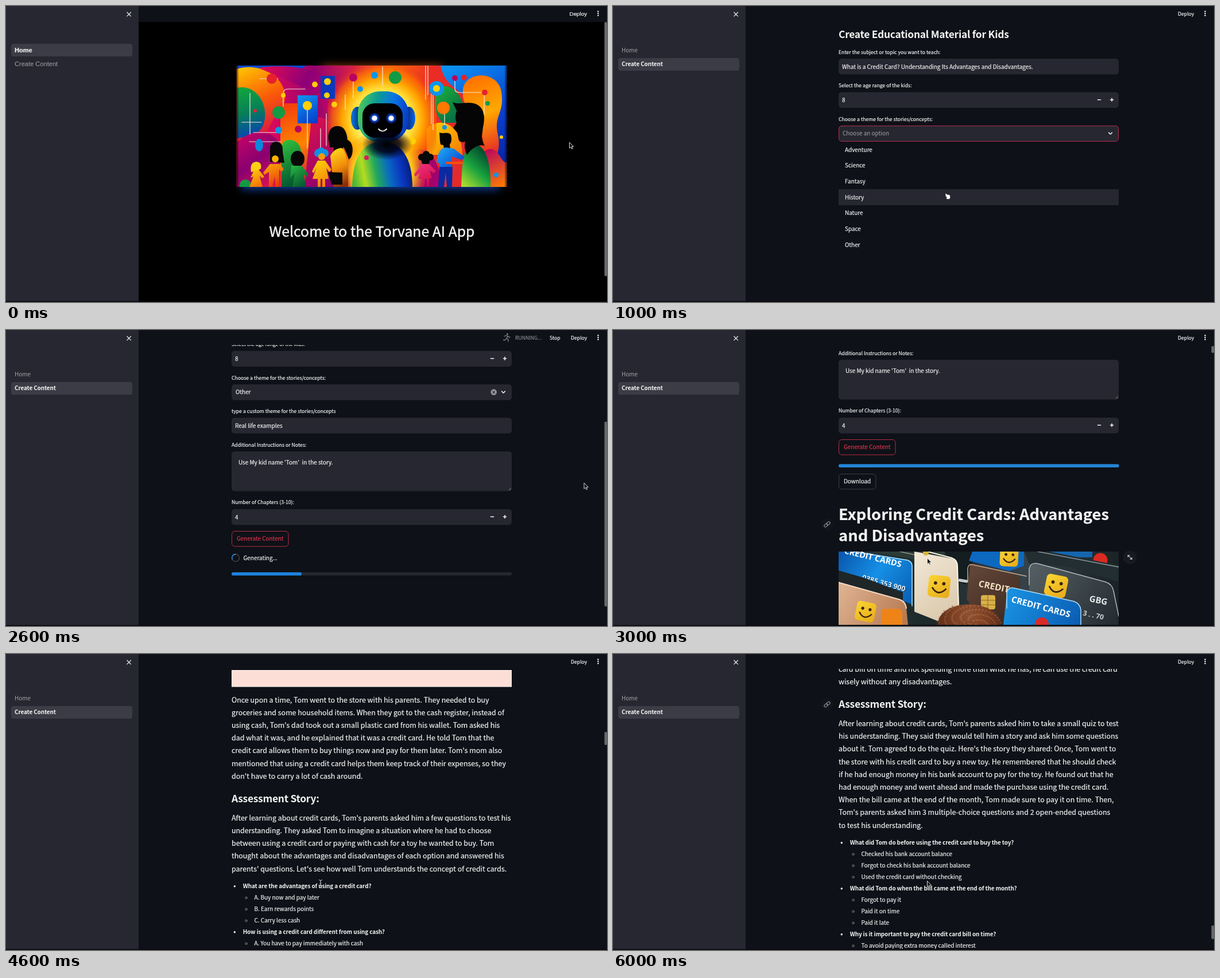
An HTML page with a canvas that plays this animation: 1047x517 px, repeating every 7 s.

```html
<!DOCTYPE html>
<html lang="en">
<head>
<meta charset="utf-8">
<title>Teaching material demo</title>
<style>
html, body { margin: 0; width: 100%; height: 100%; overflow: hidden; background: #0e1117; }
canvas, svg { position: absolute; left: 0; top: 0; width: 1047px; height: 517px; }
text { font-family: "Noto Sans CJK SC", "Noto Sans CJK JP", "Noto Sans CJK", sans-serif; font-size: 9.93px; color: #f4f4f5; fill: currentColor; stroke: currentColor; stroke-width: .2px; white-space: pre; }
.label { font-size: 8.69px; }
.para { font-size: 12.41px; }
.strong { font-weight: 600; letter-spacing: -.012em; stroke: none; }
.h1 { font-size: 27.3px; font-weight: 700; }
.h2 { font-size: 22.33px; font-weight: 600; letter-spacing: -.014em; stroke: none; }
.h3 { font-size: 17.37px; font-weight: 600; letter-spacing: -.014em; stroke: none; }
.hero { font-size: 24.8px; stroke-width: .5px; }
.dim { color: #a3a4a9; stroke: none; }
.red { color: #d8344d; }
.plain { font-family: "Liberation Sans", Arial, sans-serif; font-size: 11.09px; }
.plain.small { font-size: 9.9px; }
.bold { font-weight: 700; }
</style>
</head>
<body>
<canvas id="stage" width="1047" height="517"></canvas>
<svg viewBox="0 0 1047 517">
  <clipPath id="below"><rect x="232" y="26" width="810" height="489"/></clipPath>
  <g id="bar"></g>
  <g id="page" clip-path="url(#below)"></g>
  <g id="pointer"></g>
</svg>
<script>
const c = document.getElementById('stage').getContext('2d');
const [bar, page, pointer] = ['bar', 'page', 'pointer'].map(id => document.getElementById(id));
const PANEL = '#262730', DARK = '#0e1117', INK = '#f4f4f5';

// Drawing helpers
function node(parent, tag, attrs, content = '') {
  const el = document.createElementNS('http://www.w3.org/2000/svg', tag);
  for (const k in attrs) el.setAttribute(k, attrs[k]);
  el.textContent = content;
  parent.append(el);
}
const text = (x, y, s, cls = '', parent = page) => node(parent, 'text', { x, y, class: cls }, s);
const lines = (y, step, cls, rows) => rows.forEach((s, i) => text(393, y + i * step, s, cls));

function rect(x, y, w, h, fill, r = 0, stroke) {
  c.beginPath();
  c.roundRect(x, y, w, h, r);
  if (fill) { c.fillStyle = fill; c.fill(); }
  if (stroke) { c.strokeStyle = stroke; c.lineWidth = 1; c.stroke(); }
}
function oval(x, y, rx, ry, fill, turn = 0) {
  c.beginPath();
  c.ellipse(x, y, rx, ry, turn, 0, 7);
  c.fillStyle = fill;
  c.fill();
}
const dot = (x, y, r, fill) => oval(x, y, r, r, fill);
function shape(d, fill) {
  c.fillStyle = fill;
  c.fill(new Path2D(d));
}
function line(d, color = INK, width = 1) {
  c.strokeStyle = color;
  c.lineWidth = width;
  c.lineCap = c.lineJoin = 'round';
  c.stroke(new Path2D(d));
}
function stops(g, colors) {
  colors.forEach((k, i) => g.addColorStop(i / (colors.length - 1), k));
  return g;
}
const lin = (x0, y0, x1, y1, ...k) => stops(c.createLinearGradient(x0, y0, x1, y1), k);
const rad = (x, y, r, ...k) => stops(c.createRadialGradient(x, y, 0, x, y, r), k);
function inside(x, y, w, h, draw) {
  c.save();
  c.beginPath();
  c.rect(x, y, w, h);
  c.clip();
  draw();
  c.restore();
}
function word(x, y, s, size, turn, fill = '#fff') {
  c.save();
  c.translate(x, y);
  c.rotate(turn);
  c.font = `700 ${size}px "Open Sans", sans-serif`;
  c.fillStyle = fill;
  c.fillText(s, 0, 0);
  c.restore();
}

// Pointers
const arrow = (x, y) => node(pointer, 'path', {
  d: 'M0 0V10.4L2.4 8.2L4.2 11.8L5.8 11L4.1 7.5H7.2Z',
  transform: `translate(${x} ${y})`, fill: '#111', stroke: '#e8e8e8', 'stroke-width': .9
});
const beam = () => node(pointer, 'path', {
  d: 'M545 394.5Q548 394.5 548 397Q548 394.5 551 394.5M548 396V404M545 405.5Q548 405.5 548 403Q548 405.5 551 405.5M546.5 400.5H549.5',
  fill: 'none', stroke: '#c4c4c6', 'stroke-width': 1
});
const hand = () => node(pointer, 'path', {
  d: 'M579 329Q578 327.5 580 327.5L583 329.5L586 329.5Q588 331 587.5 335L586 337.5H582L579.5 334.5H582L579.5 332.5Z',
  fill: '#fff', stroke: '#222', 'stroke-width': .6
});

// Interface parts
function chrome(thumb, home) {
  rect(0, 0, 1047, 517, DARK);
  if (home) rect(231, 28, 816, 488, '#000');
  rect(0, 0, 231, 517, PANEL);
  rect(9, home ? 66 : 91, 211, 22, '#3b3c45', 4);
  rect(0, 515.5, 1047, 1.5, '#07080b');
  line('M210.8 11L217.6 17.8M217.6 11L210.8 17.8', INK, 1.1);
  [9.4, 13, 16.6].forEach(y => dot(1031.5, y, 1.25, INK));
  if (thumb) rect(1042.5, thumb[0], 4.5, thumb[1] - thumb[0], '#68696c', 2);
  if (home) {
    text(15, 81, 'Home', 'plain bold', bar);
    text(15, 105, 'Create Content', 'plain dim', bar);
    text(981.5, 16.8, 'Deploy', 'plain small', bar);
  } else {
    text(15, 80.8, 'Home', 'dim', bar);
    text(15, 105.4, 'Create Content', 'strong', bar);
    text(984, 16.8, 'Deploy', 'label', bar);
  }
}
const box = (y, h = 27.5) => rect(393, y, 488, h, PANEL, 5);
function field(y, s) {
  box(y);
  text(399, y + 17.5, s);
}
function stepper(y, s) {
  field(y, s);
  const m = y + 13.3;
  line(`M844.5 ${m}H849.5M866.5 ${m}H871.5M869 ${m - 2.5}V${m + 2.5}`, INK, 1.6);
}
const chevron = y => line(`M863.6 ${y - 1.4}L866.5 ${y + 1.5}L869.4 ${y - 1.4}`, INK, 1.5);
function button(y, w, s, cls, edge) {
  rect(393.5, y + .5, w, 26.5, DARK, 5, edge);
  text(402, y + 17.3, s, cls);
}
function notes(y) {
  text(393, y + 3.3, 'Additional Instructions or Notes:', 'label');
  box(y + 11.5, 69.5);
  text(405, y + 34.5, "Use My kid name 'Tom'  in the story.");
  line(`M876 ${y + 79}L879.5 ${y + 75.5}M878.2 ${y + 79}L879.5 ${y + 77.7}`, '#a0a0a4', .7);
  text(393, y + 103.8, 'Number of Chapters (3-10):', 'label');
  stepper(y + 112.5, '4');
  button(y + 150.5, 98.5, 'Generate Content', 'red', '#b52f47');
}
function link(y) {
  dot(373, y, 11, '#12151c');
  c.save();
  c.translate(373, y);
  c.rotate(-.7);
  rect(-6, -2.2, 6.4, 4.4, null, 2.2, '#a0a1a6');
  rect(-.4, -2.2, 6.4, 4.4, null, 2.2, '#a0a1a6');
  c.restore();
}
// Leading mark: "*" bold question, "-" answer, "+" plain bullet, "_" continuation
function list(y, rows, step = 20) {
  rows.forEach((row, i) => {
    const kind = row[0], m = y + i * step, sub = kind === '-';
    if (sub) {
      c.beginPath();
      c.arc(418.5, m + .3, 1.7, 0, 7);
      c.strokeStyle = '#b5b5b9';
      c.lineWidth = .7;
      c.stroke();
    } else if (kind !== '_') dot(398.3, m + .2, 1.7, INK);
    text(sub ? 432.5 : 412.7, m + 3.8, row.slice(1), kind === '*' ? 'strong' : '');
  });
}

// Pictures
function smiley(x, y, s, turn = .15) {
  c.save();
  c.translate(x, y);
  c.rotate(turn);
  c.scale(s / 34, s / 34);
  rect(-17, -17, 34, 34, lin(-17, -17, 17, 17, '#fbd634', '#e5a91a'), 6);
  dot(-6, -5, 2.6, '#3c220c');
  dot(7, -5, 2.6, '#3c220c');
  line('M-10 3Q0 16 11 3', '#3c220c', 2.4);
  c.restore();
}

function party() {
  c.save();
  c.shadowBlur = 15;
  c.shadowColor = '#a8430c';
  c.shadowOffsetY = -3;
  rect(550, 108, 210, 30, '#000');
  c.shadowColor = '#123f9c';
  c.shadowOffsetY = 5;
  rect(410, 290, 450, 25, '#000');
  c.restore();
  inside(401.5, 104, 471.5, 212, () => {
    rect(401, 104, 473, 213, lin(402, 0, 873, 0, '#e8261f', '#d4085f', '#93026f', '#d5204a', '#ff7a08', '#ec2c22', '#e02a30', '#f0600c'));

    // Left backdrop
    shape('M402 104H522Q500 128 470 116T402 122Z', '#0b48cf');
    shape('M402 110C440 98 480 120 486 152S455 190 450 245H402Z', lin(402, 110, 460, 230, '#ffc400', '#fa5a08', '#d80f4c'));
    shape('M440 108C490 100 560 108 580 150C585 190 560 205 545 160C520 140 485 128 440 108Z', lin(450, 104, 580, 180, '#e20a52', '#8d0078', '#c8085e'));
    shape('M402 143C432 136 454 165 451 195S426 228 402 231Z', lin(402, 145, 430, 230, '#12a63c', '#067f58', '#0640ba'));
    shape('M402 238C440 205 472 220 483 255V316H402Z', lin(402, 220, 475, 316, '#cd0565', '#8a0070', '#e5184c'));
    shape('M478 170H535V316H478Z', lin(478, 170, 530, 316, '#f23a0e', '#ff8300', '#cc0a48'));
    shape('M480 316V246C482 226 517 230 514 260V316Z', lin(480, 235, 515, 310, '#2fc03c', '#03502f'));
    shape('M532 196C560 188 592 210 600 316H520Z', lin(530, 200, 600, 300, '#d8104f', '#870070'));

    // Right backdrop and halo
    shape('M700 316V262C720 235 755 255 760 316Z', '#a3046c');
    shape('M733 214C755 192 795 205 795 260H733Z', lin(735, 205, 790, 260, '#ffd400', '#f67a06'));
    shape('M748 155C760 120 805 150 800 204H760Q742 180 748 155Z', lin(750, 150, 800, 200, '#19ab3b', '#045f48'));
    shape('M757 104H873V316H836C850 270 840 200 824 178C800 150 765 145 757 104Z', lin(770, 110, 873, 290, '#0c90f0', '#0843d4', '#071f98'));
    shape('M796 146C800 113 857 112 863 150S849 190 857 225S842 295 834 245S792 180 796 146Z', lin(800, 120, 855, 260, '#ff6a00', '#ffa800', '#e42228'));
    shape('M832 255C858 235 862 280 873 272V316H832Z', lin(835, 250, 870, 316, '#b9045f', '#ff8000'));
    rect(560, 104, 190, 213, rad(656, 198, 106, '#fff', '#fffbd8', '#fff3a0', '#ffe03a', '#ffa400', 'rgba(255,110,0,.7)', 'rgba(220,20,40,0)'));
    oval(656, 290, 78, 70, rad(656, 290, 78, '#ffe24a', '#ffe24a', '#ffc61a', 'rgba(255,150,0,0)'));

    // Panels, circuit lines and dots
    rect(508, 156, 35, 49, lin(508, 156, 540, 205, '#0f98f2', '#0738c6'));
    rect(548, 122, 25, 40, '#0a39bd');
    line('M425 152V224M411 203H445M442 127H474M431 221H480M424 237H479M483 175V153Q483 145 491 145H521M525 174V248M548 214V262M558 188V244M591 155V181M605 126V161M656 106V139M731 104V163M735 104V155M741 153V206M744 153V216M764 178V211M782 124V145Q782 151 790 151H834M833 151V190', '#f7eadc', 1.2);
    const hues = ['#ffcf0a', '#e5222c', '#0a96ec', '#129a44', '#b8045f', '#ff7800'];
    [463, 127, 9, 1, 475, 186, 11, 3, 483, 156, 4, 0, 525, 174, 8, 0, 538, 137, 5, 0,
      560, 132, 6, 0, 559, 156, 5, 0, 572, 172, 5, 0, 605, 125, 7, 4, 617, 145, 5, 2,
      642, 121, 6, 2, 678, 125, 11, 3, 750, 144, 13, 2, 750, 144, 6, 0, 762, 178, 11, 5,
      782, 126, 5, 4, 798, 125, 5, 1, 834, 151, 5, 1, 839, 170, 4, 3, 475, 217, 6, 2,
      434, 183, 3, 1, 509, 215, 6, 4, 764, 212, 4, 2, 708, 236, 6, 0, 863, 229, 3, 0
    ].forEach((v, i, a) => { if (i % 4 === 0) dot(v, a[i + 1], a[i + 2], hues[a[i + 3]]); });
    oval(441, 243, 7, 11, '#0a88dc');
    dot(417, 313, 10, '#129a44');
    dot(854, 295, 4, hues[2]);

    // Robot
    oval(612, 196, 11, 20, lin(602, 0, 622, 0, '#0a78e0', '#04124c'));
    oval(702, 196, 11, 20, lin(692, 0, 713, 0, '#04124c', '#0a68ea'));
    rect(613, 149, 88, 89, lin(613, 185, 701, 200, '#4cc85c', '#0c9c94', '#0a72e6', '#0838c4'), 38);
    rect(621, 170, 70, 60, '#000', 21);
    [642, 671].forEach(x => {
      dot(x, 196, 9.5, rad(x, 196, 9.5, '#49b8ff', '#0f4fee', '#020830'));
      dot(x, 196, 4.6, '#fff');
    });
    line('M649 215Q656 222 663 215', '#fff', 2);
    shape('M603 316C604 260 624 237 656 237S708 265 708 316Z', lin(603, 300, 708, 280, '#3fb53a', '#b4dc20', '#22a85a', '#0a6cc0', '#0a36c0', '#051a70'));
    c.save();
    c.translate(664, 242);
    c.scale(1, .62);
    dot(0, 0, 44, rad(0, 0, 44, '#000', 'rgba(0,0,20,.85)', 'rgba(0,0,30,0)'));
    c.restore();
    dot(628, 265, 4, '#d81b60');

    // Adults
    shape('M562 236C559 218 568 208 580 210C590 211 594 222 595 234C607 238 606 264 597 268C594 258 590 250 588 246L583 256H570L571 247H564Z', '#050505');
    shape('M565 262Q572 248 585 248Q597 256 596 316H571Z', lin(566, 255, 594, 310, '#ffd21a', '#f08c08', '#8a2c06'));
    shape('M561 290L586 291V312H567Z', '#080808');
    shape('M793 316C795 281 794 254 808 244C834 232 846 275 844 316Z', lin(797, 312, 843, 262, '#a8dc30', '#18a23e', '#034a30'));
    shape('M778 168C790 173 800 167 815 170C832 174 836 192 831 212L829 228Q830 238 834 244Q818 240 803 260Q797 248 800 237Q788 240 788 230L786 221L779 213L785 204Q781 194 785 183Z', '#050505');
    shape('M755 221C762 224 770 219 775 225Q778 236 773 242L774 250H763L762 243L757 242L756 236Z', '#050505');
    shape('M750 273Q753 248 766 247L780 249L799 264L794 269L777 263V283H755V275Z', lin(752, 245, 785, 280, '#20b0f6', '#0850d4'));
    shape('M755 281H778L777 316H768L766 291L763 316H753Z', '#0a2aa2');

    // Children
    shape('M460 272V247Q461 236 472 237Q483 239 482 254L485 274Z', '#080808');
    dot(469, 267, 6, '#ffb400');
    shape('M460 276H478L484 286L480 289L476 286V316H470L468 298L464 316H458V290L450 295L448 291Z', lin(460, 275, 478, 316, '#f8a208', '#e8300c'));
    shape('M427 290Q424 272 437 272Q446 273 444 284L438 288Z', '#ffcf14');
    shape('M432 287H441L450 298L447 301L442 297L447 316H424L431 298L426 300Z', lin(430, 284, 446, 316, '#ffca0a', '#f06a08'));
    oval(508, 267, 12, 14, '#070707');
    shape('M497 279H515L527 294L523 299L518 293L523 316H499L503 292L495 300Z', lin(497, 279, 523, 316, '#28b440', '#034f2e'));
    [544, 549, 555].forEach((x, i) => dot(x, 257 - i % 2 * 3, 7, '#0c90e4'));
    dot(550, 263, 6, '#f49a0a');
    shape('M543 270H556L567 286L563 290L558 283L562 302H556V316H551V302H548V316H543V302H534L541 282L536 292L533 289Z', lin(540, 270, 562, 310, '#ffd00a', '#f08208'));
    [724, 732, 739].forEach((x, i) => dot(x, 264 - i % 2 * 5, 6, '#080808'));
    dot(731, 271, 7, '#080808');
    shape('M725 276H737L749 288L745 292L738 287L742 301H737V315H733V302H729V315H725V302H718L722 290L713 298L711 294Z', lin(720, 276, 742, 312, '#f0307c', '#d00a44'));
    line('M768 274H794', '#f5500c', 4);

    // Darkened rim
    const rim = 'rgba(0,0,0,.75)', none = 'rgba(0,0,0,0)';
    rect(401, 104, 5, 212, lin(401, 0, 406, 0, rim, none));
    rect(868, 104, 5, 212, lin(873, 0, 868, 0, rim, none));
  });
}

function cards() {
  inside(393, 387, 488, 128, () => {
    rect(393, 387, 488, 128, lin(393, 0, 881, 0, '#2a3c40', '#1c2829', '#36424a', '#1a2225'));
    shape('M455 387H578V412L520 400Z', '#2c3b36');
    line('M500 387L577 404V430', '#8d9990', 1.4);
    shape('M578 387H632L615 445L602 440Z', '#141d20');
    shape('M626 387H716V412L690 421L620 403Z', '#0d68c0');
    smiley(690, 397, 32, .05);
    rect(760, 387, 75, 10, '#1566ae');
    dot(849, 402, 12.5, '#dc2a22');
    shape('M716 387H760L881 411V440L800 415L725 408Z', '#222e31');
    line('M740 387L881 414', '#8e9ba0', 1.3);

    // Left cards
    shape('M393 387H425L513 401Q522 404 522 412V480L393 425Z', lin(393, 387, 522, 470, '#0a55ac', '#1590e6', '#0a60b4'));
    line('M418 387L513 402Q521 405 521 412V482', '#b1dcf0', 1.5);
    word(402, 390, 'CREDIT CARDS', 14.5, .24);
    word(434, 437, '0385 353 900', 12.5, .27, '#12385c');
    word(433, 436, '0385 353 900', 12.5, .27, '#e4f2fa');
    shape('M525 387L590 399Q600 403 600 412L603 486L570 510L525 492Z', lin(525, 390, 600, 500, '#f2e8d6', '#d9c7aa'));
    line('M548 387L590 398Q600 402 600 412L602 486', '#fff6e4', 2);
    smiley(568, 448, 38, .1);
    dot(545, 389, 5, '#d6b43a');
    line('M604 437L616 439', '#c8d0cf', 5);
    shape('M393 420L438 433L505 458V474L393 440Z', '#1e2628');
    shape('M393 440L500 471Q510 475 511 486L514 515H393Z', lin(393, 440, 510, 515, '#e0b594', '#b5784f'));
    line('M393 441L500 471Q510 475 511 486', '#f4d8c2', 2);
    smiley(440, 492, 34, .2);
    rect(467, 487, 37, 34, '#ee8418', 8);

    // Right cards
    shape('M622 409L698 425Q708 428 709 440V515H650L616 470Z', lin(620, 410, 700, 515, '#64483a', '#3c281f'));
    line('M618 438V416Q619 408 627 410L720 430', '#c9aa8c', 1.5);
    word(636, 448, 'CREDIT', 15.5, .2, '#f2e2c2');
    rect(641, 463, 25, 25, '#d9b146', 4);
    line('M641 472H666M641 480H666M653 463V488', '#876627', 1);
    shape('M725 418Q727 405 740 408L858 440Q870 444 872 456L881 515H790L725 465Z', lin(725, 410, 870, 515, '#566064', '#252d31'));
    line('M725 445V418Q727 405 740 408L858 440Q870 444 872 456L881 500', '#afb8bb', 1.5);
    smiley(772, 447, 38, .2);
    word(829, 474, 'GBG', 15, .2, '#e5e9ea');
    word(818, 498, '3 . . 70', 12, .22, '#cdd4d7');
    shape('M686 459Q688 448 700 451L803 474Q814 478 815 489V515H680Z', lin(686, 450, 815, 515, '#1a94e4', '#0a5cb2'));
    line('M686 486V459Q688 448 700 451L803 474Q814 478 815 489V515', '#abdcf3', 1.5);
    word(693, 475, 'CREDIT CARDS', 15, .26);
    dot(747, 514, 12, '#d82b28');

    // Curly hair
    oval(620, 513, 54, 34, rad(622, 496, 58, '#9c5c3a', '#834527', '#5a2b18'));
    for (let i = 0; i < 420; i++) {
      const a = i * 2.4, r = Math.sqrt(i / 420) * 1.04;
      dot(620 + Math.cos(a) * r * 54, 513 + Math.sin(a) * r * 34, 1.5, i % 3 ? '#6b351c80' : '#b0704a70');
    }
  });
}

function savings() {
  inside(393, 427, 488, 88, () => {
    rect(393, 427, 488, 88, '#fcfcfb');
    oval(639, 542, 228, 91, '#9ed0dc');
    rect(603, 471, 67, 60, '#bb7650', 5);
    rect(609, 478, 55, 50, '#fbfaf5');
    rect(620, 467, 35, 11, '#87969b', 4);
    dot(637.5, 466, 6, '#718087');
    dot(637.5, 465, 2.5, '#d9e9ec');
    word(624, 493, 'SVING', 8, .02, '#34383b');
    shape('M618 515V507H614L622 498L630 506H626V515Z', '#df6670');
    shape('M632 515V502H628L635 495L642 502H639V515Z', '#65ac77');
    shape('M646 515V508H643L650 498L657 507H653V515Z', '#df6670');
    oval(494, 510, 15, 10, '#9d422e', -.2);
    oval(529, 524, 43, 23, '#ad4c32');
    line('M482 512Q490 499 505 507M506 515Q526 498 553 510M520 515Q535 506 552 513', '#672819', 1.7);
    oval(796, 516, 23, 10, '#f7fbfb');
  });
}

// Scenes, one second each
const scenes = [
  () => {
    chrome([28, 472], true);
    party();
    text(458.5, 403, 'Welcome to the Torvane AI App', 'hero');
    arrow(981.5, 238);
  },
  () => {
    chrome();
    text(393, 56.2, 'Create Educational Material for Kids', 'h3');
    text(393, 83.5, 'Enter the subject or topic you want to teach:', 'label');
    field(92, 'What is a Credit Card? Understanding Its Advantages and Disadvantages.');
    text(393, 142.3, 'Select the age range of the kids:', 'label');
    stepper(150.5, '8');
    text(393, 200.7, 'Choose a theme for the stories/concepts:', 'label');
    rect(393.5, 209.3, 487, 27, PANEL, 5, '#b82e50');
    text(400, 226.4, 'Choose an option', 'dim');
    chevron(222.5);
    rect(393, 320, 488, 28, PANEL);
    ['Adventure', 'Science', 'Fantasy', 'History', 'Nature', 'Space', 'Other']
      .forEach((s, i) => text(404, 254.6 + i * 27.7, s));
    hand();
  },
  () => {
    chrome([160, 483]);
    dot(873.5, 7.3, 1.5, '#85868c');
    line('M868 11L871 9.5L874 10.5L872 14.5L875 16.5V20M872 14.5L870 17.5H866.5M874 10.5L876 12.5H878', '#85868c', 1.3);
    text(887, 16.8, 'RUNNING...', 'label dim', bar);
    text(947, 16.8, 'Stop', 'label', bar);
    text(393, 28.3, 'Select the age range of the kids:', 'label');
    stepper(36.5, '8');
    text(393, 86.7, 'Choose a theme for the stories/concepts:', 'label');
    box(95);
    text(400, 112.4, 'Other');
    dot(849.7, 108.5, 5.2, '#96979c');
    line('M847.9 106.7L851.5 110.3M851.5 106.7L847.9 110.3', PANEL, 1.1);
    chevron(108.5);
    text(393, 145.3, 'type a custom theme for the stories/concepts', 'label');
    field(153.3, 'Real life examples');
    notes(200.5);
    c.beginPath();
    c.arc(400, 398, 6.4, 0, 7);
    c.strokeStyle = '#3d3e48';
    c.lineWidth = 1.6;
    c.stroke();
    line('M394 400.3A6.4 6.4 0 0 1 400 391.6', '#2e86d8', 1.6);
    text(413.5, 401.8, 'Generating...');
    rect(393, 423.3, 488, 5.5, PANEL, 2.5);
    rect(393, 423.3, 122, 5.5, '#1c83e1', 2.5);
    arrow(1007, 267);
  },
  () => {
    chrome([28, 40]);
    notes(40.5);
    rect(393, 234.3, 488.5, 5.7, '#2384d6', 2.8);
    button(251, 64.5, 'Download', '', '#3d3f48');
    link(339.5);
    lines(332, 36.6, 'h1', ['Exploring Credit Cards: Advantages', 'and Disadvantages']);
    cards();
    dot(900.5, 397, 12, '#171a21');
    line('M897 396.5V393.5H900M897 393.5L900 396.5M904 397.5V400.5H901M904 400.5L901 397.5', '#c9c9cc', 1.1);
    arrow(547.5, 398.5);
  },
  () => {
    chrome([136, 159]);
    rect(393, 28, 488, 29.5, '#fff3ef');
    rect(394, 29, 486, 27.5, '#fcded7');
    lines(84.5, 22.2, 'para', [
      'Once upon a time, Tom went to the store with his parents. They needed to buy',
      'groceries and some household items. When they got to the cash register, instead of',
      "using cash, Tom's dad took out a small plastic card from his wallet. Tom asked his",
      'dad what it was, and he explained that it was a credit card. He told Tom that the',
      "credit card allows them to buy things now and pay for them later. Tom's mom also",
      'mentioned that using a credit card helps them keep track of their expenses, so they',
      "don't have to carry a lot of cash around."
    ]);
    text(393, 259.2, 'Assessment Story:', 'h3');
    lines(290.8, 22.2, 'para', [
      "After learning about credit cards, Tom's parents asked him a few questions to test his",
      'understanding. They asked Tom to imagine a situation where he had to choose',
      'between using a credit card or paying with cash for a toy he wanted to buy. Tom',
      'thought about the advantages and disadvantages of each option and answered his',
      "parents' questions. Let's see how well Tom understands the concept of credit cards."
    ]);
    list(405.6, [
      '*What are the advantages of using a credit card?',
      '-A. Buy now and pay later', '-B. Earn rewards points', '-C. Carry less cash',
      '*How is using a credit card different from using cash?',
      '-A. You have to pay immediately with cash'
    ]);
    beam();
  },
  () => {
    chrome([372, 397]);
    list(25.2, [
      '-You get charged a late fee', '-You get a discount', "-You don't have to pay the bill",
      '*What can happen if you only pay the minimum amount on your credit card bill?',
      '-You save money', '-You avoid interest', '-You end up paying a lot more in interest',
      '*How can overspending with a credit card lead to financial trouble?',
      '-You can buy more things', '-You can go on a fun shopping spree',
      '-You may not have enough money to pay off the balance'
    ]);
    text(393, 261, 'Open Questions:', 'para');
    list(287, [
      '+Can you think of a time when you or someone you know faced challenges because of using a credit',
      '_card?'
    ], 17.7);
    list(324.7, ['+What are some ways to avoid the disadvantages of using a credit card?']);
    lines(379.5, 29.9, 'h2', ['Chapter 4: Making Smart Choices with Credit', 'Cards']);
    savings();
    beam();
  },
  () => {
    chrome([474, 498]);
    lines(30.6, 22.2, 'para', [
      'card bill on time and not spending more than what he has, he can use the credit card',
      'wisely without any disadvantages.'
    ]);
    link(88);
    text(393, 94.2, 'Assessment Story:', 'h3');
    lines(126, 22.2, 'para', [
      "After learning about credit cards, Tom's parents asked him to take a small quiz to test",
      'his understanding. They said they would tell him a story and ask him some questions',
      "about it. Tom agreed to do the quiz. Here's the story they shared: Once, Tom went to",
      'the store with his credit card to buy a new toy. He remembered that he should check',
      'if he had enough money in his bank account to pay for the toy. He found out that he',
      'had enough money and went ahead and made the purchase using the credit card.',
      'When the bill came at the end of the month, Tom made sure to pay it on time. Then,',
      "Tom's parents asked him 3 multiple-choice questions and 2 open-ended questions",
      'to test his understanding.'
    ]);
    list(329.5, [
      '*What did Tom do before using the credit card to buy the toy?',
      '-Checked his bank account balance', '-Forgot to check his bank account balance',
      '-Used the credit card without checking',
      '*What did Tom do when the bill came at the end of the month?',
      '-Forgot to pay it', '-Paid it on time', '-Paid it late',
      '*Why is it important to pay the credit card bill on time?',
      '-To avoid paying extra money called interest'
    ]);
    arrow(547.5, 396.5);
  }
];

const start = performance.now();
let shown = -1;
function tick() {
  const i = Math.floor((performance.now() - start) / 1000) % scenes.length;
  if (i !== shown) {
    shown = i;
    [bar, page, pointer].forEach(g => g.replaceChildren());
    scenes[i]();
  }
  requestAnimationFrame(tick);
}
tick();
</script>
</body>
</html>
```
